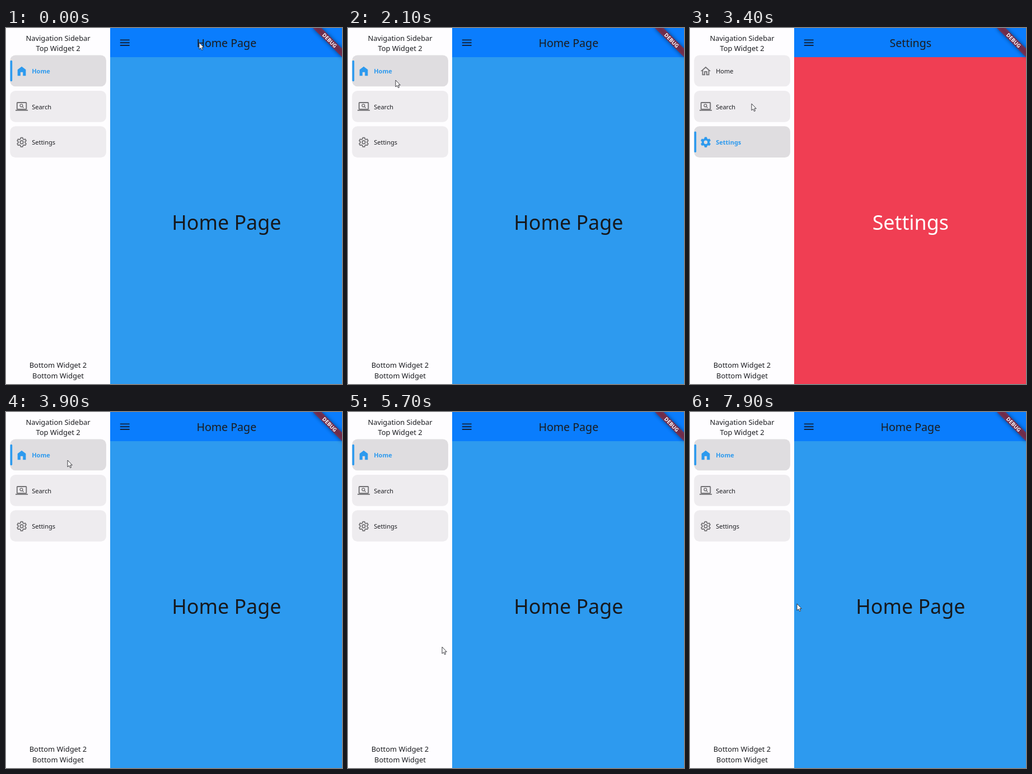
Recreate the animation shown at these times as an HTML page. Size 600x635 px, loop 8000 ms.

```html
<!DOCTYPE html>
<html lang="en">
<head>
<meta charset="utf-8">
<title>Navigation sidebar</title>
<style>
  html, body { margin: 0; width: 100%; height: 100%; overflow: hidden; background: #fefdff; }
  svg { display: block; width: 600px; height: 635px; }
  text { font-family: "Noto Sans", "Open Sans", sans-serif; fill: #1b1c20; }
  .capI { font-family: "Open Sans", sans-serif; }
  .mid { text-anchor: middle; }
</style>
</head>
<body>
<svg id="stage" viewBox="0 0 600 635">
  <defs>
    <filter id="soft" x="-50%" y="-150%" width="200%" height="400%">
      <feGaussianBlur stdDeviation="3.6"/>
    </filter>
  </defs>
  <rect width="186" height="635" fill="#fefdff"/>
  <g class="mid" font-size="12.9">
    <text x="93" y="22.5">Navigation Sidebar</text>
    <text x="93" y="41">Top Widget 2</text>
    <text x="93" y="606">Bottom Widget 2</text>
    <text x="93" y="624.5">Bottom Widget</text>
  </g>
  <g id="items"></g>
  <rect id="page" x="186" y="51" width="414" height="584"/>
  <rect x="186" width="414" height="52" fill="#0a7dfd"/>
  <path d="M203.8 21.4h16.8M203.8 26.2h16.8M203.8 31h16.8" stroke="#10233f" stroke-width="1.85"/>
  <text id="title" class="mid" x="393.8" y="34.3" font-size="19.6"></text>
  <text id="heading" class="mid" x="393.8" y="359.5" font-size="35.8"></text>
  <g transform="translate(600 0) rotate(45)">
    <rect x="-36.8" y="25.8" width="73.6" height="11" fill="#000" opacity=".5" filter="url(#soft)"/>
    <rect x="-36.8" y="25.8" width="73.6" height="11" fill="#b71c1c" opacity=".6"/>
    <text class="mid" y="34.7" font-size="9.4" font-weight="900" style="fill:#fff">DEBUG</text>
  </g>
  <path id="cursor" d="M0 0V12L2.8 9.5 4.6 13.6 6.5 12.8 4.8 8.8H8.3Z" fill="#fff" stroke="#25252b" stroke-width=".9" stroke-linejoin="round"/>
</svg>
<script>
const LOOP = 8000, STEP = 100;
const ACCENT = '#2d9aee', GREY = '#727174', SELECTED = '#dfdde0', IDLE = '#eeecef';
const $ = id => document.getElementById(id);

// Six-toothed gear outline in a 24-unit icon box.
function gear(root, tip) {
  const points = [];
  for (let tooth = 0; tooth < 360; tooth += 60)
    for (const [r, a] of [[root, -22], [tip, -11], [tip, 11], [root, 22]]) {
      const angle = (tooth + a) * Math.PI / 180;
      points.push((12 + r * Math.sin(angle)).toFixed(2) + ' ' + (12 - r * Math.cos(angle)).toFixed(2));
    }
  return 'M' + points.join('L') + 'Z';
}

const lens = color =>
  `<g fill="none" stroke="${color}" stroke-width="1.5"><circle cx="11.3" cy="9.8" r="2.6"/><path d="M13.2 11.7l2.6 2.6"/></g>`;
const base = color => `<path d="M0 18h24v2H0z" fill="${color}"/>`;

const icons = {
  Home: on => on
    ? `<path d="M12 3L4 9v12h5.6v-7h4.8v7H20V9z" fill="${ACCENT}"/>`
    : `<path d="M12 5.69l5 4.5V18h-2v-6H9v6H7v-7.81zM12 3L2 12h3v8h6v-6h2v6h6v-8h3z" fill="${GREY}"/>`,
  Search: on => on
    ? `<rect x="2" y="3" width="20" height="14.6" rx="2" fill="${ACCENT}"/>${base(ACCENT)}${lens('#f4f4f8')}`
    : `<rect x="3" y="4" width="18" height="13" rx="1" fill="none" stroke="${GREY}" stroke-width="2"/>${base(GREY)}${lens(GREY)}`,
  Settings: on => on
    ? `<path d="${gear(7.4, 9.9)}" fill="${ACCENT}" stroke="${ACCENT}" stroke-width=".5" stroke-linejoin="round"/><circle cx="12" cy="12" r="3.5" fill="${SELECTED}"/>`
    : `<g fill="none" stroke="${GREY}" stroke-width="1.9" stroke-linejoin="round"><path d="${gear(6.7, 9.1)}"/><circle cx="12" cy="12" r="3"/></g>`
};

const pages = [
  { title: 'Home Page', color: '#2d9aef', ink: '#17191d' },
  { title: '<tspan class="capI">I</tspan>nfo Page', color: '#42df5b', ink: '#17191d' },
  { title: 'Settings', color: '#f03e53', ink: '#fff' }
];

function item(name, index, on) {
  const top = 48.5 + index * 63.4;
  const bar = on ? `<rect x="7.5" y="${top + 9.2}" width="3.7" height="37.5" rx="1.8" fill="${ACCENT}"/>` : '';
  const style = on ? `style="fill:${ACCENT}" font-weight="700"` : '';
  return `<rect x="7.3" y="${top}" width="171.6" height="55.8" rx="9.5" fill="${on ? SELECTED : IDLE}"/>${bar}
    <g transform="translate(17 ${top + 17.4}) scale(.92)">${icons[name](on)}</g>
    <text x="46.2" y="${top + 32.6}" font-size="11" ${style}>${name}</text>`;
}

let shown = -1;
function showPage(index) {
  if (index === shown) return;
  shown = index;
  const { title, color, ink } = pages[index];
  $('items').innerHTML = Object.keys(icons).map((name, i) => item(name, i, i === index)).join('');
  $('page').setAttribute('fill', color);
  $('title').innerHTML = $('heading').innerHTML = title;
  $('heading').style.fill = ink;
}

// Pointer stops: time, x, y.
const path = [
  [0, 345, 26], [300, 350, 30], [900, 350, 350], [1400, 300, 427], [2100, 85, 93],
  [2500, 88, 138], [2700, 91, 130], [3000, 100, 204], [3400, 110, 135], [3700, 110, 84],
  [3900, 110, 86], [4400, 95, 8], [4600, 120, 22], [5300, 120, 592], [5450, 130, 594],
  [5700, 168, 419], [6300, 192, 352], [7200, 190, 354], [7900, 191, 342], [8000, 191, 342]
];

function pointerAt(t) {
  const i = path.findIndex(stop => stop[0] > t);
  const [t0, x0, y0] = path[i - 1], [t1, x1, y1] = path[i];
  const p = (t - t0) / (t1 - t0), k = p * p * (3 - 2 * p);
  return [x0 + (x1 - x0) * k, y0 + (y1 - y0) * k];
}

function draw(time) {
  const t = Math.floor((time % LOOP) / STEP) * STEP;
  showPage(t < 2500 || t >= 3800 ? 0 : t < 3000 ? 1 : 2);
  $('cursor').setAttribute('transform', `translate(${pointerAt(t)})`);
}

const start = performance.now();
function tick() {
  draw(performance.now() - start);
  requestAnimationFrame(tick);
}
tick();
</script>
</body>
</html>
```
